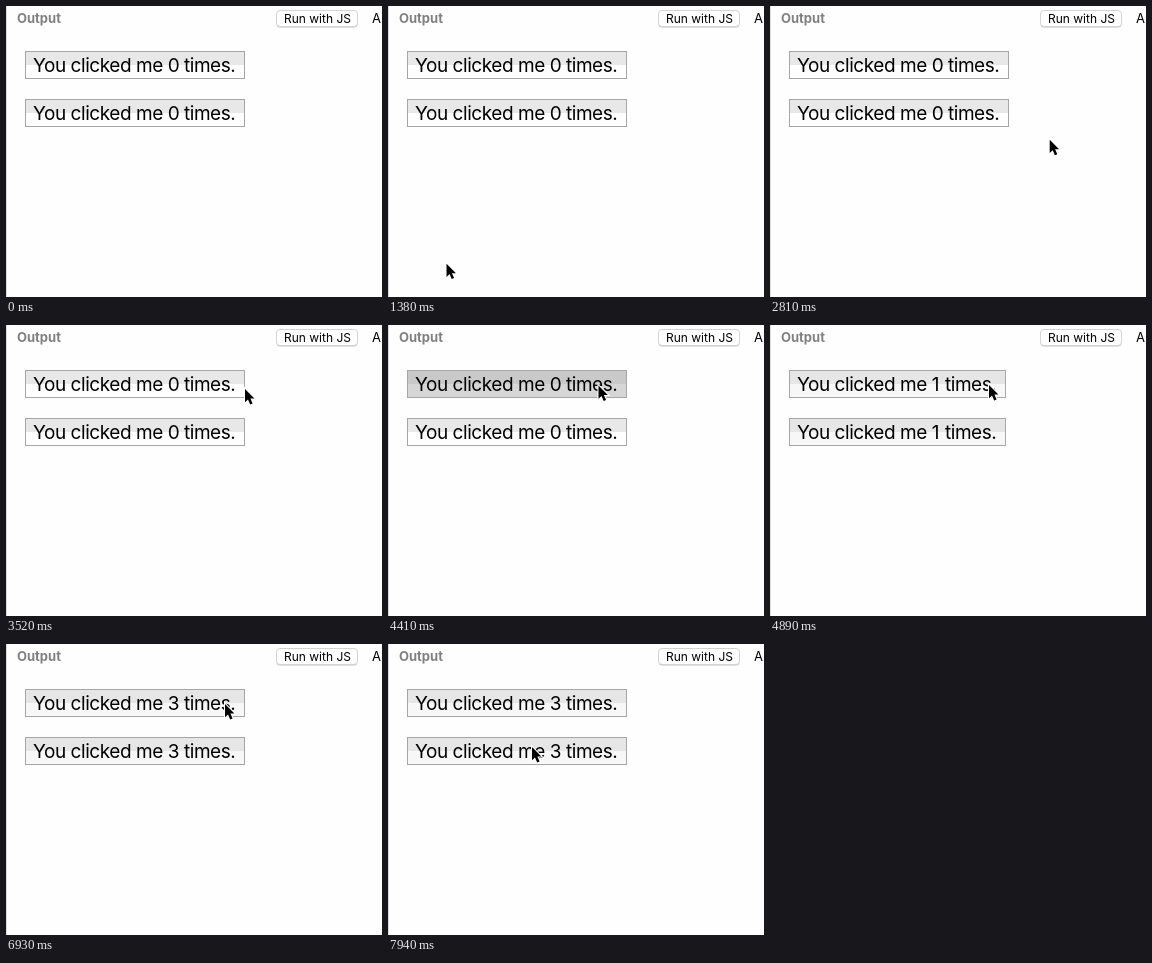
These frames come from a looping animation (376x291 px, 8 s). An HTML page:

```html
<!DOCTYPE html>
<html>
<head>
<meta charset="utf-8">
<style>
html, body { margin: 0; width: 100%; height: 100%; overflow: hidden; background: #fefefe; }
svg { display: block; font-family: Inter, "Open Sans", sans-serif; }
.label { font-size: 19px; letter-spacing: -.45px; white-space: pre; }
.frame { fill: none; stroke: #a6a6a6; }
</style>
</head>
<body>
<svg width="376" height="291" viewBox="0 0 376 291">
  <path d="M.5 0V291" stroke="#dcdcdc"/>
  <text x="11" y="17" font-size="13" font-weight="700" fill="#808080">Output</text>
  <rect x="270.5" y="5.5" width="81" height="16" rx="3.5" fill="#c4c4c4"/>
  <rect x="270.5" y="4.5" width="81" height="16" rx="3.5" fill="#fff" stroke="#d4d4d4"/>
  <text x="278" y="17" font-size="12">Run with JS</text>
  <text x="366" y="17" font-size="13">Auto-run JS</text>
  <g id="buttons"></g>
  <path id="cursor" d="M0 0V13.2L3 10.4L5.2 15.4L7.6 14.4L5.4 9.5H9.4Z"
        stroke="#fff" stroke-width="2" paint-order="stroke"/>
</svg>
<script>
const LOOP = 8000;
const clicks = [[4410, 4650], [5550, 5850], [6510, 6930]]; // press, release
const rights = [239, 236, 238, 239];  // button edge per count
const wordX = [178, 175, 177, 178];   // start of "times." per count
const fills = {
  idle: ['#e8e8e8', '#ffffff'],
  active: ['#e6e6e6', '#f7f7f7'],
  pressed: ['#c9c9c9', '#d6d6d6']
};

// start, end, number of steps, waypoints of the pointer tip
const moves = [
  [1320, 1860, 10, [[-40, 295], [130, 232], [235, 204], [255.5, 199.5]]],
  [2030, 2030, 1, [[255.5, 199.5], [255, 200.5]]],
  [2390, 3170, 14, [[255, 200.5], [273, 165], [280, 122], [268, 88]]],
  [3220, 3870, 12, [[268, 88], [239, 64], [210.5, 60.5]]],
  [4830, 4890, 2, [[210.5, 60.5], [219, 60]]],
  [7400, 7940, 10, [[219, 60], [243, 94], [216, 128], [144, 103]]]
];

const $ = id => document.getElementById(id);

// Catmull-Rom through the waypoints, p from 0 to 1
function along(pts, p) {
  const last = pts.length - 1;
  const i = Math.min(Math.floor(p * last), last - 1), u = p * last - i;
  const at = k => pts[Math.max(0, Math.min(last, k))];
  return [0, 1].map(d => {
    const [a, b, c, e] = [-1, 0, 1, 2].map(k => at(i + k)[d]);
    return b + u / 2 * (c - a + u * (2 * a - 5 * b + 4 * c - e + u * (3 * (b - c) + e - a)));
  });
}

function pointer(t) {
  const move = moves.filter(m => t >= m[0]).pop();
  if (!move) return null;
  const [start, end, steps, pts] = move;
  const gap = (end - start) / (steps - 1) || 1;
  const step = Math.min(steps - 1, Math.floor((t - start) / gap + .001));
  return along(pts, (step + 1) / steps);
}

function button(y, count, state) {
  const w = rights[count] - 19, [top, bottom] = fills[state];
  return `<rect x="19" y="${y}" width="${w}" height="14" fill="${top}"/>
    <rect x="19" y="${y + 14}" width="${w}" height="14" fill="${bottom}"/>
    <rect class="frame" x="19.5" y="${y + .5}" width="${w - 1}" height="27"/>
    <text class="label" x="27" y="${y + 21}">You clicked me ${count} <tspan x="${wordX[count]}">times.</tspan></text>`;
}

let shown;
function draw(now) {
  const t = now % LOOP;
  const count = clicks.filter(c => t >= c[1]).length;
  const pressed = clicks.some(([down, up]) => t >= down && t < up);
  const state = count ? 'active' : 'idle';
  const key = count + state + pressed;
  if (key !== shown) {
    $('buttons').innerHTML = button(45, count, pressed ? 'pressed' : state) + button(93, count, state);
    shown = key;
  }
  const tip = pointer(t);
  $('cursor').setAttribute('visibility', tip ? 'visible' : 'hidden');
  if (tip) $('cursor').setAttribute('transform', `translate(${tip})`);
}

const begin = performance.now();
function tick() {
  draw(performance.now() - begin);
  requestAnimationFrame(tick);
}
tick();
</script>
</body>
</html>
```
